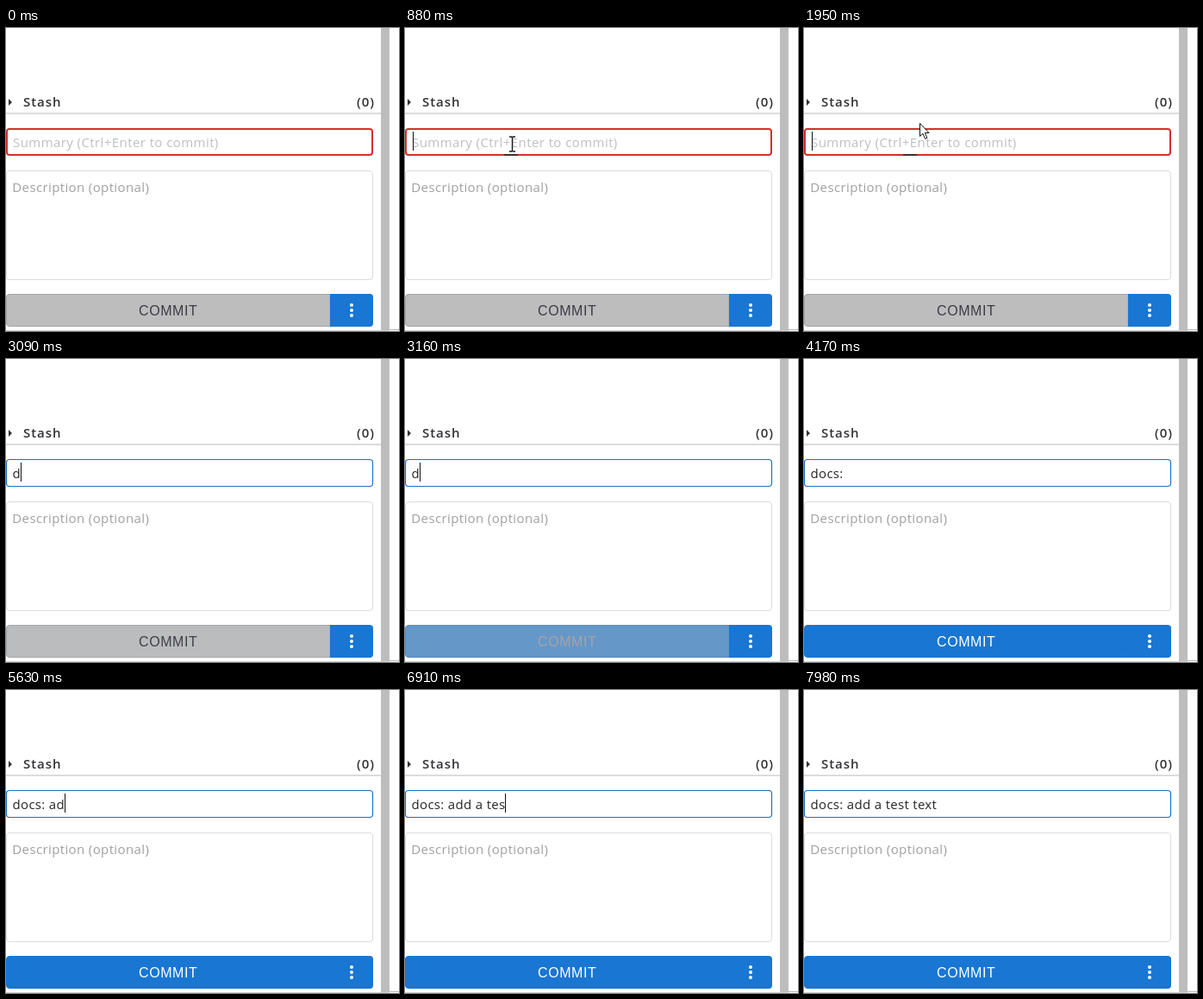
These frames come from a looping animation (456x351 px, 8 s). An HTML page:

```html
<!DOCTYPE html>
<html lang="en">
<head>
<meta charset="utf-8">
<title>Commit form</title>
<style>
  html, body { margin: 0; width: 100%; height: 100%; overflow: hidden; background: #fff; }
  svg { display: block; width: 456px; height: 351px; }
  text { font: 15px "Open Sans", "Noto Sans", sans-serif; white-space: pre; }
  .head { font-weight: 600; letter-spacing: .95px; fill: #333036; }
  .typed { letter-spacing: .32px; fill: #26262a; }
  .button { font: 16px "Liberation Sans", Arial, sans-serif; letter-spacing: .58px; }
</style>
</head>
<body>
<svg viewBox="0 0 456 351">
  <rect x="435" width="10" height="350" fill="#bdbdbd"/>
  <rect x="445" y="349" width="11" height="1" fill="#b4b4b4"/>
  <rect y="350" width="445" height="1" fill="#d2d2d2"/>

  <path d="M3 82L7 86L3 90Z" fill="#333"/>
  <text class="head" x="20" y="91">Stash</text>
  <text class="head" x="407" y="91">(0)</text>
  <rect y="98" width="435" height="2" fill="#dcdcdc"/>

  <rect id="field" fill="#fff"/>
  <rect id="smear" x="115" y="146" width="16" height="2" fill="#4a2c2c"/>
  <text id="hint" x="8" y="138" fill="#bcc0c0" letter-spacing=".42">Summary (Ctrl+Enter to commit)</text>
  <text id="typed" class="typed" x="7.5" y="138"></text>
  <rect id="caret" y="120" width="1" height="22" fill="#111"/>

  <rect x=".5" y="165.5" width="425" height="126" rx="3.5" fill="#fff" stroke="#dcdcdc"/>
  <text x="7.3" y="190" fill="#a0a0a0" letter-spacing=".38">Description (optional)</text>

  <path id="commit" d="M376 308.5H4Q.5 308.5 .5 312V342Q.5 345.5 4 345.5H376Z"/>
  <text id="label" class="button" x="154" y="333">COMMIT</text>
  <path d="M376 308H422Q426 308 426 312V342Q426 346 422 346H376Z" fill="#1976d2"/>
  <g fill="#fff">
    <circle cx="401" cy="321" r="2"/>
    <circle cx="401" cy="327" r="2"/>
    <circle cx="401" cy="333" r="2"/>
  </g>

  <path id="beam" d="M-3.5 -8.5H-1L0 -7.5L1 -8.5H3.5M0 -7.5V7.5M-3.5 8.5H-1L0 7.5L1 8.5H3.5" fill="none" stroke="#1a1a1a" stroke-width="1.4"/>
  <path id="arrow" d="M.5 .5V15.5L4 12.3L6.5 18.3L8.8 17.3L6.3 11.5H11Z" fill="#fff" stroke="#111"/>
</svg>
<script>
const LOOP = 8000;
const MESSAGE = "docs: add a test text";
const START_TYPING = 3090;
// time at which each character of MESSAGE appears
const KEYS = [3090, 3230, 3300, 3440, 3640, 3910, 5430, 5630, 5760, 5960, 6090,
  6510, 6710, 6780, 6910, 6980, 7310, 7440, 7640, 7780, 7850];
// times at which the caret shows and hides in turn
const BLINKS = [810, 1350, 1950, 2480, 3030, 4170, 4700, 5230, 5430, 6310, 6510, 7980];
// pointer stops after the click: time, x, y
const STOPS = [[880, 124.5, 134.5], [950, 130.5, 128.5], [1010, 133, 119.5], [1080, 134, 110]];

const el = Object.fromEntries([...document.querySelectorAll("[id]")].map(e => [e.id, e]));
const passed = (times, t) => times.filter(k => k <= t).length;
const show = (e, on) => e.setAttribute("visibility", on ? "visible" : "hidden");
const set = (e, attrs) => { for (const k in attrs) e.setAttribute(k, attrs[k]); };
const mix = (a, b, p) => `rgb(${a.map((v, i) => Math.round(v + (b[i] - v) * p))})`;

// cubic-bezier(.4, 0, .2, 1)
function ease(x) {
  if (x <= 0 || x >= 1) return x <= 0 ? 0 : 1;
  let lo = 0, hi = 1, u = .5;
  for (let i = 0; i < 20; i++) {
    u = (lo + hi) / 2;
    const bx = 1.2 * u * (1 - u) ** 2 + .6 * u * u * (1 - u) + u ** 3;
    if (bx < x) lo = u; else hi = u;
  }
  return 3 * u * u * (1 - u) + u ** 3;
}

function pointer(t) {
  const stop = STOPS.filter(s => s[0] <= t).pop();
  if (stop) return stop.slice(1);
  const p = Math.min(1, Math.floor((t - 70) / 74) / 10);
  const q = 1 - (1 - p) ** 2;
  return [Math.round(325 - 213 * q) + .5, Math.round(264 - 124 * q) + .5];
}

function drawPointer(t) {
  const on = t >= 70 && t < START_TYPING;
  const [x, y] = pointer(t);
  const inText = (y > 116 && y < 148) || y > 165;
  for (const [e, want] of [[el.beam, inText], [el.arrow, !inText]]) {
    show(e, on && want);
    e.setAttribute("transform", `translate(${x} ${y})`);
  }
}

function drawField(t) {
  const typing = t >= START_TYPING;
  set(el.field, typing
    ? { x: .5, y: 116.5, width: 425, height: 31, rx: 3.5, stroke: "#1b73c4", "stroke-width": 1.2 }
    : { x: 1, y: 117, width: 424, height: 30, rx: 3, stroke: "#d32f2f", "stroke-width": 2 });
  show(el.smear, t >= 880 && !typing);
  show(el.hint, !typing);
  const text = MESSAGE.slice(0, passed(KEYS, t));
  if (el.typed.textContent !== text) el.typed.textContent = text;
  el.caret.setAttribute("x", text ? Math.round(7.5 + el.typed.getComputedTextLength()) : 9);
  show(el.caret, passed(BLINKS, t) % 2 === 1);
}

function drawButton(t) {
  const p = ease((t - START_TYPING + 20) / 250);
  const blue = [25, 118, 210];
  set(el.commit, { fill: mix([189, 189, 189], blue, p), stroke: mix([165, 165, 165], blue, p) });
  el.label.setAttribute("fill", mix([62, 58, 70], [255, 255, 255], p));
}

function frame() {
  const t = performance.now() % LOOP;
  drawPointer(t);
  drawField(t);
  drawButton(t);
  requestAnimationFrame(frame);
}
frame();
</script>
</body>
</html>
```
